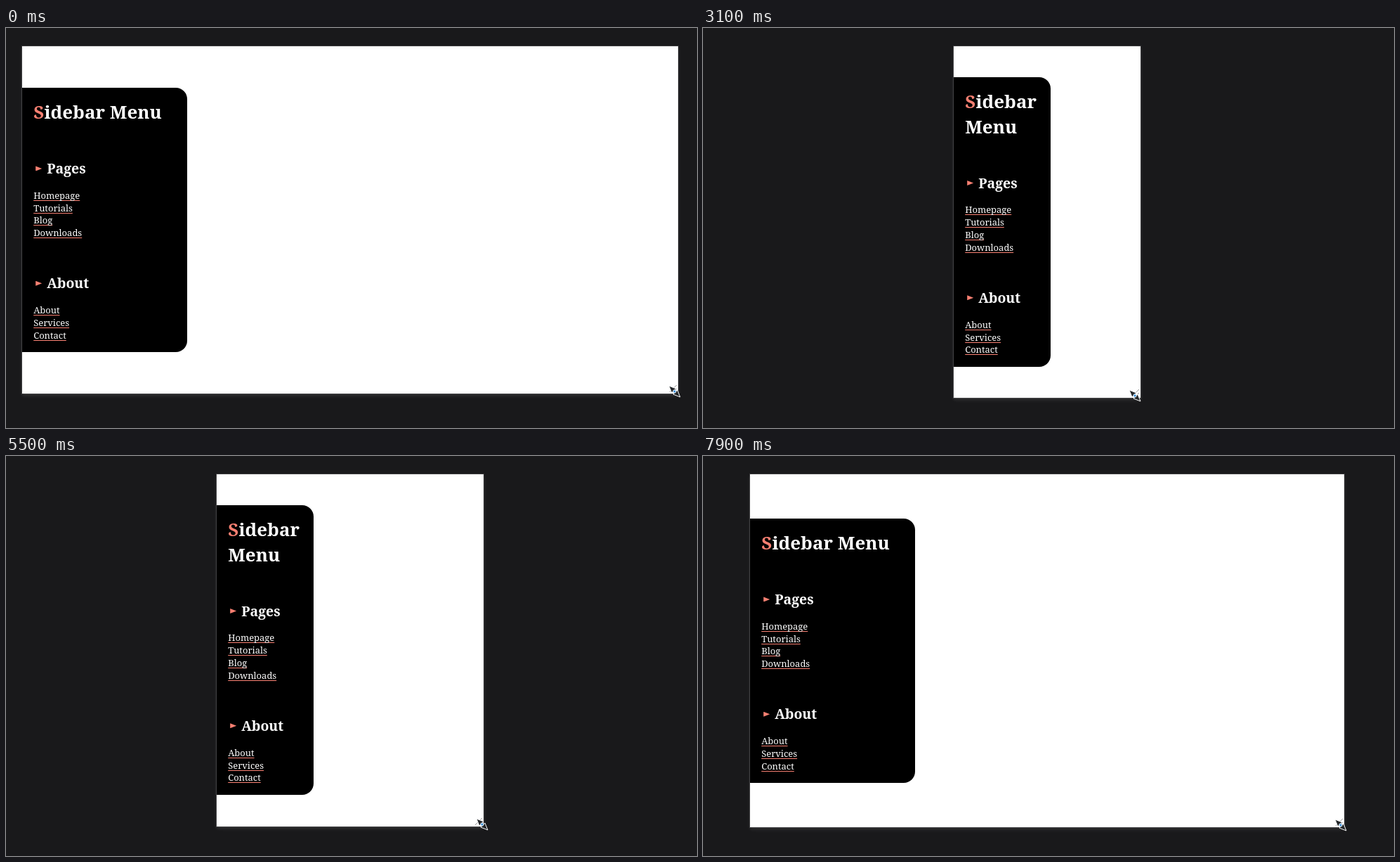
Recreate the animation shown at these times as an HTML page. Size 984 by 569 pixels, loop 8 s.

```html
<!DOCTYPE html>
<html lang="en">
<head>
<meta charset="utf-8">
<title>Sidebar Menu</title>
<style>
  html, body { margin: 0; width: 100%; height: 100%; overflow: hidden; background: #19191b; }
  #page {
    position: absolute; top: 26px; background: #fff;
    box-shadow: 0 0 0 1px rgba(255, 255, 255, .15), 0 3px 5px rgba(255, 255, 255, .1);
  }
  #sidebar {
    position: absolute; left: 0; box-sizing: border-box; padding: 17.2px 16.2px 14.6px;
    border-radius: 0 16.2px 16.2px 0; background: #000; color: #fff;
    font: 12.96px/17.8px "Noto Serif", serif; white-space: nowrap;
  }
  h1, h2, ul { margin: 0; padding: 0; }
  h1 { font-size: 2em; line-height: 35.6px; }
  h1 b { color: salmon; }
  .wrapped h1 span { display: block; }
  h2 { margin: 49.2px 0 16.2px; padding-left: 19px; position: relative; font-size: 1.5em; line-height: 26.7px; }
  h2::before {
    content: ""; position: absolute; left: 3px; top: 9.5px; width: 9px; height: 7px;
    background: salmon; clip-path: polygon(0 0, 100% 50%, 0 100%);
  }
  li { list-style: none; }
  li span { text-decoration: underline 1px salmon; text-underline-offset: 1.6px; text-decoration-skip-ink: none; }
  svg { position: absolute; overflow: visible; }
  #grip { right: 0; bottom: 0; }
</style>
</head>
<body>
<div id="page">
  <div id="sidebar">
    <h1><b>S</b>idebar <span>Menu</span></h1>
    <h2>Pages</h2>
    <ul>
      <li><span>Homepage</span></li>
      <li><span>Tutorials</span></li>
      <li><span>Blog</span></li>
      <li><span>Downloads</span></li>
    </ul>
    <h2>About</h2>
    <ul>
      <li><span>About</span></li>
      <li><span>Services</span></li>
      <li><span>Contact</span></li>
    </ul>
  </div>
  <svg id="grip" width="15" height="15" stroke="#999">
    <path d="M3 13L13 3M8 13L13 8"/>
  </svg>
</div>
<svg id="cursor" width="1" height="1" stroke="#fff" stroke-linejoin="round">
  <path fill="#232629" d="M-8-8L2-4L-4 2ZM8 8L-2 4L4-2Z"/>
  <circle r="2.2" fill="#3b8fd6"/>
</svg>
<script>
const LOOP = 8000, STEP = 100, CENTER = 490, TOP = 26;
const CURSOR_LEAD = 35; // ms by which the pointer runs ahead of the page edge

// Half the page width at the turns of the drag: [ms, px]
const drag = [[200, 467], [1200, 322.5], [1900, 247], [2900, 143], [3100, 133],
  [3900, 84], [4440, 84], [6200, 260], [7900, 423]];

const [page, sidebar, cursor] = ["page", "sidebar", "cursor"].map(id => document.getElementById(id));
const clamp = (x, min, max) => Math.min(max, Math.max(min, x));

function halfWidth(t) {
  const next = clamp(drag.findIndex(key => key[0] > t), 0, drag.length - 1) || (t < drag[0][0] ? 1 : drag.length - 1);
  const [t0, a] = drag[next - 1], [t1, b] = drag[next];
  return a + (b - a) * clamp((t - t0) / (t1 - t0), 0, 1);
}

// The hand drifts down slowly while it drags
const bottomEdge = t => 520 + 8 * (1 - Math.exp(-t / 2400));

function place(element, box) {
  for (const side in box) element.style[side] = box[side] + "px";
}

function draw(now) {
  const t = Math.floor(now % LOOP / STEP) * STEP;
  const half = halfWidth(t), bottom = bottomEdge(t);
  const left = Math.round(CENTER - half), height = Math.round(bottom) - TOP;
  place(page, { left, width: 2 * (CENTER - left), height });

  const barWidth = clamp(.49 * half + 35.8, 138, 235);
  sidebar.classList.toggle("wrapped", barWidth < 235);
  place(sidebar, { width: Math.round(barWidth), top: Math.floor((height - sidebar.offsetHeight) / 2) });

  place(cursor, { left: CENTER + halfWidth(t + CURSOR_LEAD) - 5.5, top: bottom - 2.8 });
}

function tick(now) {
  draw(now);
  requestAnimationFrame(tick);
}
draw(0);
requestAnimationFrame(tick);
</script>
</body>
</html>
```
